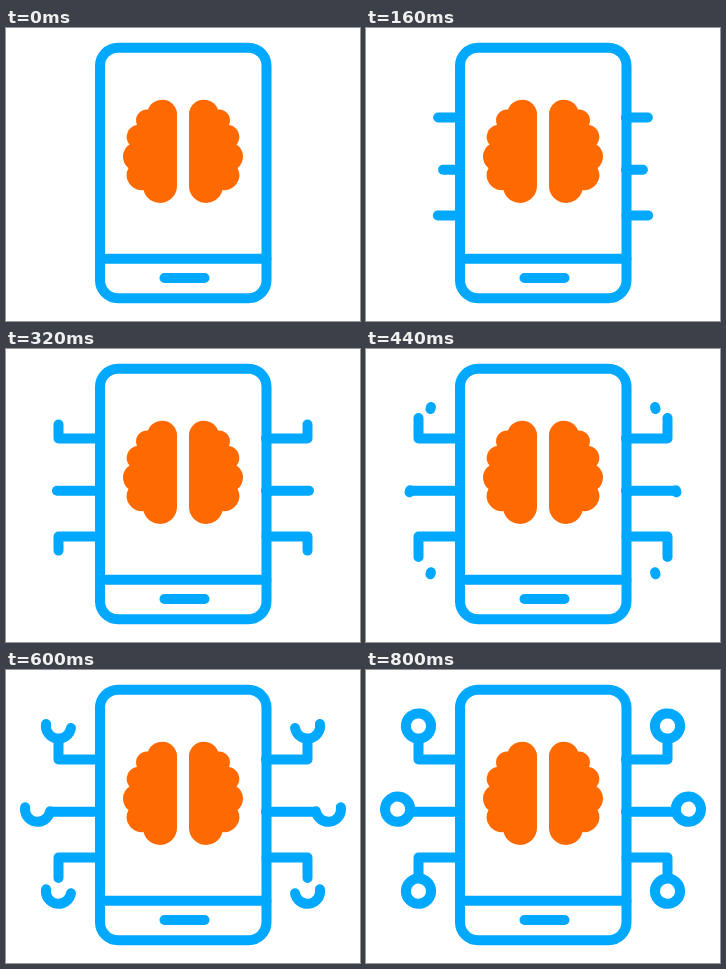
Recreate the animation shown at these times as an HTML page. Size 354 by 293 pixels, loop 1.64 s.

```html
<!DOCTYPE html>
<html lang="en">
<head>
<meta charset="utf-8">
<title>Phone with a brain and circuit nodes</title>
<style>
  @property --tick {
    syntax: "<number>";
    inherits: true;
    initial-value: 0;
  }

  html, body {
    margin: 0;
    width: 100%;
    height: 100%;
    overflow: hidden;
    background: #fff;
  }

  svg {
    display: block;
    width: 100%;
    height: 100%;
    fill: none;
    stroke: #00a8ff;
    stroke-width: 10;
    stroke-linecap: round;
    stroke-linejoin: round;
    animation: tick 1640ms steps(41) infinite;
  }

  /* 25 ticks per second */
  @keyframes tick {
    from { --tick: 0; }
    to { --tick: 41; }
  }

  .brain { fill: #ff6a00; stroke: none; }

  /* Each part draws itself over 10 ticks with a smoothstep ease */
  .wire, .node {
    --age: calc(var(--tick) - var(--start));
    --p: clamp(0, var(--age) / 10, 1);
    --ease: calc(var(--p) * var(--p) * (3 - 2 * var(--p)));
    stroke-dasharray: 100 200;
    stroke-dashoffset: calc((1 - var(--ease)) * 100px);
    opacity: clamp(0, var(--age), 1);
  }
  .wire { --start: 0; }
  .node { --start: 10; }
</style>
</head>
<body>
<svg viewBox="0 0 354 293">
  <g id="half">
    <path class="brain" d="M171 88A15 15 0 0 0 142 81.5A11 11 0 0 0 131 97A12 12 0 0 0 123.5 116.5A14.5 14.5 0 0 0 122.5 140A15 15 0 0 0 137.5 162A17 17 0 0 0 171 158Z"/>
    <path class="wire" pathLength="100" d="M94 89.5H52.5V69"/>
    <path class="wire" pathLength="100" d="M94 141.8H46"/>
    <path class="wire" pathLength="100" d="M93.5 187.5H52.5V208"/>
    <circle class="node" pathLength="100" cx="52.5" cy="56" r="12.6" transform="rotate(9 52.5 56)"/>
    <circle class="node" pathLength="100" cx="31.6" cy="139.2" r="12.6" transform="rotate(9 31.6 139.2)"/>
    <circle class="node" pathLength="100" cx="52.5" cy="221.2" r="12.6" transform="rotate(9 52.5 221.2)"/>
  </g>
  <use href="#half" transform="matrix(-1 0 0 1 354 0)"/>

  <rect x="94" y="19.8" width="166.5" height="250.4" rx="18"/>
  <path d="M94 230.8H260.5M158.5 250H198.5"/>
</svg>
</body>
</html>
```
